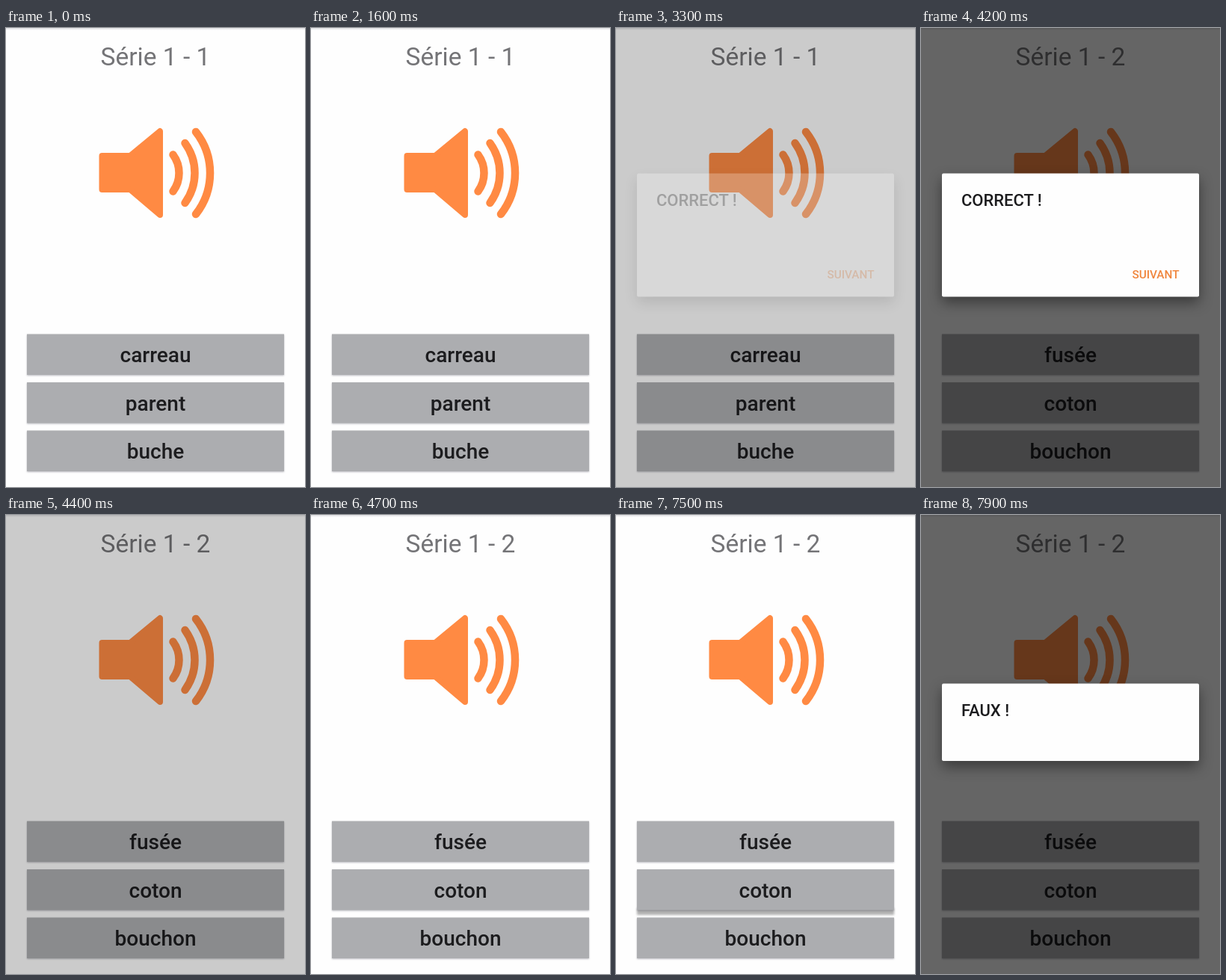
These frames come from a looping animation (400x614 px, 8000 ms). An HTML page without scripts:

```html
<!DOCTYPE html>
<html lang="fr">
<head>
<meta charset="utf-8">
<title>Quiz audio</title>
<style>
  html, body { margin: 0; width: 100%; height: 100%; overflow: hidden; background: #fefefe; }
  svg { display: block; width: 100%; height: 100%; font-family: Roboto, sans-serif; }

  .title { font-size: 33.5px; fill: #747477; text-anchor: middle; }
  .labels { font-size: 28px; font-weight: 500; fill: #1c1c1e; text-anchor: middle; }
  .button { fill: #acadb0; filter: drop-shadow(0 1.5px 1px rgba(40, 40, 60, .32)); }
  .speaker { fill: #ff8a43; stroke: #ff8a43; stroke-linecap: round; stroke-linejoin: round; }
  .waves { fill: none; stroke-width: 10.5; }
  .card { fill: #fefefe; filter: drop-shadow(0 8px 9px rgba(0, 0, 0, .42)); }
  .message { font-size: 22px; font-weight: 500; fill: #1c1c1e; }
  .action { font-size: 15.3px; font-weight: 500; fill: #f0853c; text-anchor: end; }

  .first, .second, .scrim, .right, .wrong, .press { animation: 8s step-end infinite; }
  .first { animation-name: first; }
  .second { animation-name: second; }
  .scrim { animation-name: scrim; }
  .right { animation-name: right; }
  .wrong { animation-name: wrong; }
  .press { animation-name: press; filter: blur(1.5px); }

  @keyframes first { 0% { opacity: 1 } 52.5%, 100% { opacity: 0 } }
  @keyframes second { 0% { opacity: 0 } 52.5%, 100% { opacity: 1 } }
  @keyframes scrim {
    0% { opacity: 0 }
    41.25% { opacity: .2 }
    42.5% { opacity: .5 }
    43.75% { opacity: .6 }
    53.75% { opacity: .42 }
    55% { opacity: .2 }
    56.25% { opacity: 0 }
    96.25% { opacity: .2 }
    97.5% { opacity: .5 }
    98.75%, 100% { opacity: .6 }
  }
  @keyframes right {
    0% { opacity: 0 }
    41.25% { opacity: .25 }
    42.5% { opacity: .9 }
    43.75% { opacity: 1 }
    53.75% { opacity: .3 }
    55%, 100% { opacity: 0 }
  }
  @keyframes wrong {
    0% { opacity: 0 }
    96.25% { opacity: .25 }
    97.5% { opacity: .9 }
    98.75%, 100% { opacity: 1 }
  }
  @keyframes press { 0% { opacity: 0 } 93.75% { opacity: .3 } 96.25%, 100% { opacity: 0 } }
</style>
</head>
<body>
<svg viewBox="0 0 400 614" preserveAspectRatio="none">
  <defs>
    <linearGradient id="edge" x2="0" y2="1">
      <stop stop-color="#dedee1"/>
      <stop offset="1" stop-color="#fefefe"/>
    </linearGradient>
  </defs>
  <rect width="400" height="614" fill="#fefefe"/>
  <rect width="400" height="3" fill="url(#edge)"/>

  <g class="speaker">
    <path stroke-width="8" d="M128.5 171H166L206 138V250L166 216H128.5Z"/>
    <g class="waves">
      <path d="M223.5 169.5A41.5 41.5 0 0 1 223.5 218.5"/>
      <path d="M239.5 154A68 68 0 0 1 239.5 234"/>
      <path d="M254 139A89 89 0 0 1 254 249"/>
    </g>
  </g>

  <rect class="press" x="28" y="526" width="344" height="9"/>
  <rect class="button" x="28" y="409.5" width="344" height="54.5"/>
  <rect class="button" x="28" y="474" width="344" height="54.5"/>
  <rect class="button" x="28" y="538.5" width="344" height="54.5"/>

  <g class="first">
    <text class="title" x="200" y="50">Série 1 - 1</text>
    <g class="labels">
      <text x="200" y="447">carreau</text>
      <text x="200" y="511.5">parent</text>
      <text x="200" y="576">buche</text>
    </g>
  </g>
  <g class="second">
    <text class="title" x="200" y="50">Série 1 - 2</text>
    <g class="labels">
      <text x="200" y="447">fusée</text>
      <text x="200" y="511.5">coton</text>
      <text x="200" y="576">bouchon</text>
    </g>
  </g>

  <rect class="scrim" width="400" height="614"/>

  <g class="right">
    <rect class="card" x="28" y="194.5" width="344" height="165" rx="2"/>
    <text class="message" x="54" y="238">CORRECT !</text>
    <text class="action" x="345.5" y="335">SUIVANT</text>
  </g>
  <g class="wrong">
    <rect class="card" x="28" y="225.5" width="344" height="103.5" rx="2"/>
    <text class="message" x="54" y="269">FAUX !</text>
  </g>
</svg>
</body>
</html>
```
